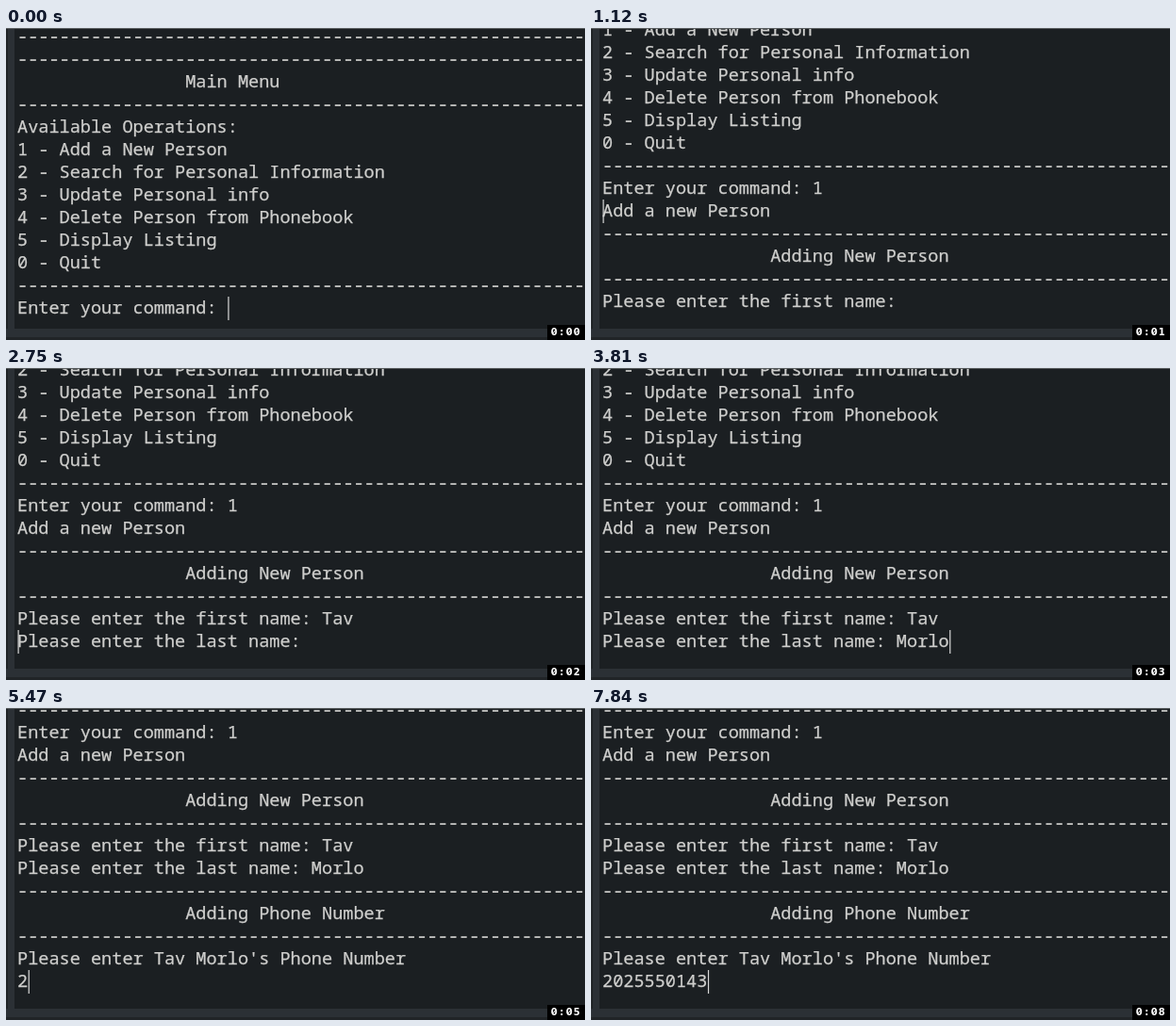
These frames come from a looping animation (614 by 331 pixels, 8000 ms). An HTML page with a canvas:

```html
<!DOCTYPE html>
<html lang="en">
<head>
<meta charset="utf-8">
<title>Phonebook terminal</title>
<style>
html, body { margin: 0; width: 100%; height: 100%; overflow: hidden; background: #1b1f22; }
canvas { display: block; }
</style>
</head>
<body>
<canvas id="stage" width="614" height="331"></canvas>
<script>
const ctx = document.getElementById('stage').getContext('2d');
const LOOP = 8000, BLINK = 530;
const LEFT = 12, BOTTOM = 278, ROW = 24, SIZE = 18.57, COL = SIZE * 0.6;
const RULE = '-'.repeat(56), INDENT = ' '.repeat(16);
const TEXT = '#cfcfcd';
const FIRST = 'Tav', LAST = 'Morlo', PHONE = '2025550143';

const rows = [
  RULE, RULE, INDENT + 'Main Menu', RULE,
  'Available Operations:',
  '1 - Add a New Person',
  '2 - Search for Personal Information',
  '3 - Update Personal info',
  '4 - Delete Person from Phonebook',
  '5 - Display Listing',
  '0 - Quit',
  RULE,
  'Enter your command: '
];
const states = [];

function save(t, row, col, shift = 0) {
  states.push({ t, rows: [...rows], row, col, shift });
}
function atEnd(t, shift) {
  const row = rows.length - 1;
  save(t, row, rows[row].length, shift);
}
function type(text, times) {
  times.forEach((t, i) => {
    rows[rows.length - 1] += text[i];
    atEnd(t);
  });
}
function enter(t) {
  rows.push('');
  atEnd(t, 7);
}
// The caret stays where the output began.
function print(t, ...lines) {
  const row = rows.length - 1;
  rows.splice(row, 1, ...lines);
  save(t, row, 0);
}

atEnd(100, 7);
type('1', [590]);
enter(960);
print(1120, 'Add a new Person', RULE, INDENT + 'Adding New Person', RULE,
  'Please enter the first name: ');
type(FIRST, [2090, 2260, 2440]);
enter(2600);
print(2750, 'Please enter the last name: ');
type(LAST, [3030, 3180, 3340, 3500, 3650]);
enter(3960);
print(4080, RULE, INDENT + 'Adding Phone Number', RULE,
  `Please enter ${FIRST} ${LAST}'s Phone Number`, '');
type(PHONE, [5340, 5510, 5680, 5850, 6020, 6300, 6610, 6770, 7290, 7690]);

const ticks = [960, 1920, 2910, 3960, 4890, 5850, 6860, 7840];

function box(color, x, y, w, h) {
  ctx.fillStyle = color;
  ctx.fillRect(x, y, w, h);
}

function drawRow(text, y) {
  const letters = text.replace(/-/g, ' ');
  ctx.fillStyle = ctx.strokeStyle = TEXT;
  ctx.lineWidth = 0.25;
  ctx.fillText(letters, LEFT, y + 18);
  ctx.strokeText(letters, LEFT, y + 18);
  [...text].forEach((c, i) => {
    if (c === '-') ctx.fillRect(LEFT + i * COL + 2.5, y + 12.2, 6.2, 1.7);
  });
}

function drawClock(seconds) {
  box('#000', 574, 315, 40, 16);
  ctx.fillStyle = ctx.strokeStyle = '#fff';
  ctx.lineWidth = 1;
  ctx.font = 'bold 10px "DejaVu Sans", sans-serif';
  ctx.textAlign = 'center';
  [...('0:0' + seconds)].forEach((c, i) => {
    const x = 581.2 + i * 8;
    ctx.fillText(c, x, 326);
    if (c !== '0') return;
    ctx.beginPath();
    ctx.moveTo(x - 1.5, 324.5);
    ctx.lineTo(x + 1.5, 320.5);
    ctx.stroke();
  });
  ctx.textAlign = 'left';
}

function draw(t) {
  const s = states.findLast(v => v.t <= t) || states[0];
  const last = s.rows.length - 1;
  const top = i => BOTTOM + s.shift - (last - i) * ROW;

  box('#1b1f22', 0, 0, 614, 331);
  ctx.save();
  ctx.beginPath();
  ctx.rect(9, 1, 604, 318);
  ctx.clip();
  ctx.font = SIZE + 'px "Noto Sans Mono", monospace';
  s.rows.forEach((text, i) => {
    if (top(i) > -ROW) drawRow(text, top(i));
  });
  const age = Math.max(0, t - s.t);
  if (Math.floor(age / BLINK) % 2 === 0) {
    box('#d8d8d8', LEFT + s.col * COL + 0.5, top(s.row), 1.2, 25);
  }
  ctx.restore();

  box('#2b3035', 0, 0, 9, 331);
  box('#1f2326', 0, 0, 2, 319);
  box('#2b3035', 0, 319, 614, 9);
  box('#202427', 0, 328, 614, 3);
  box('#5c6062', 0, 0, 614, 1);
  drawClock(ticks.filter(v => v <= t).length);
}

const start = performance.now();
function frame() {
  draw((performance.now() - start) % LOOP);
  requestAnimationFrame(frame);
}
frame();
</script>
</body>
</html>
```
